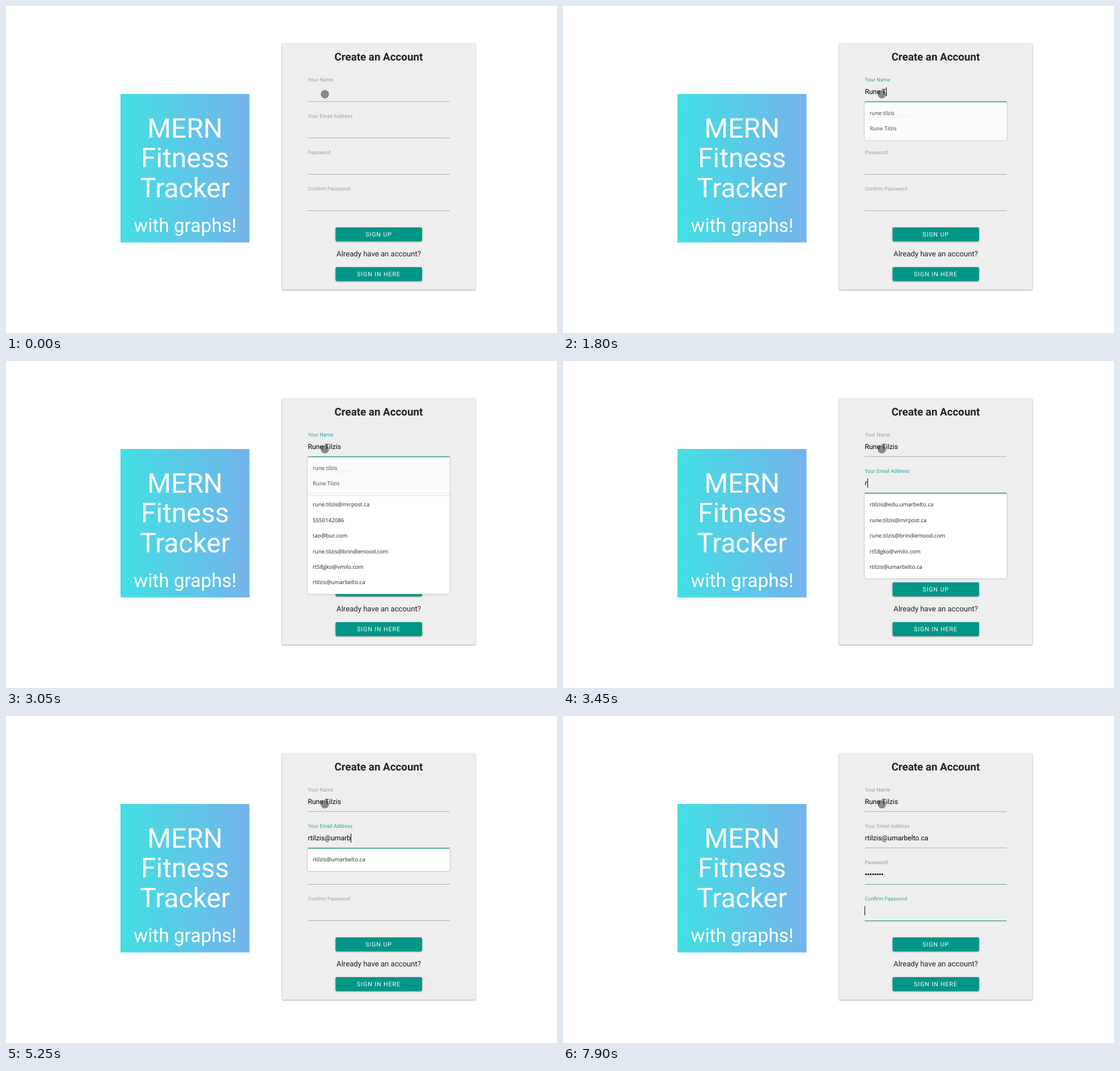
An HTML page that plays this animation: 972 px wide and 576 px high, repeating every 8000 ms.

```html
<!DOCTYPE html>
<html lang="en">
<head>
<meta charset="utf-8">
<title>Sign up form</title>
<style>
  html, body { margin: 0; width: 100%; height: 100%; overflow: hidden; background: #fff; }
  svg { display: block; width: 972px; height: 576px; }
  text { font-family: Roboto, sans-serif; text-rendering: geometricPrecision; white-space: pre; }
  .mid { text-anchor: middle; }
  .item { font: 9.7px "Open Sans", "Noto Sans", sans-serif; fill: #222; }
  .card { filter: drop-shadow(0 1px 1px rgba(0,0,0,.3)) drop-shadow(0 0 1.2px rgba(0,0,0,.16)); }
  .btn { fill: #009688; filter: drop-shadow(0 1px 1px rgba(0,0,0,.3)) drop-shadow(0 0 1px rgba(0,0,0,.16)); }
  .pop { fill: #fff; filter: drop-shadow(0 .8px 1px rgba(0,0,0,.4)); }
  .cap { font-size: 10.67px; letter-spacing: .9px; fill: #fff; }
</style>
</head>
<body>
<svg id="stage" viewBox="0 0 972 576">
  <defs>
    <linearGradient id="sky">
      <stop offset="0" stop-color="#43dfe3"/>
      <stop offset="1" stop-color="#74b3eb"/>
    </linearGradient>
  </defs>
  <rect x="202" y="155" width="227.5" height="261.5" fill="url(#sky)"/>
  <g class="mid" fill="#fff" font-size="48">
    <text x="315.8" y="231.5">MERN</text>
    <text x="315.8" y="284.3">Fitness</text>
    <text x="315.8" y="337.1">Tracker</text>
    <text x="316" y="398" font-size="33.4">with graphs!</text>
  </g>
  <rect class="card" x="487" y="66" width="341" height="433.7" rx="1.5" fill="#eee"/>
  <text class="mid" x="657.4" y="96.3" font-size="18.75" font-weight="700" fill="#212121">Create an Account</text>
  <g id="fields"></g>
  <rect class="btn" x="581.4" y="390" width="152.5" height="24.4" rx="2.3"/>
  <text class="mid cap" x="657.5" y="406">SIGN UP</text>
  <text class="mid" x="657.5" y="441" font-size="13.14" fill="#212121">Already have an account?</text>
  <rect class="btn" x="581.4" y="460" width="152.5" height="24.4" rx="2.3"/>
  <text class="mid cap" x="657.5" y="476.1">SIGN IN HERE</text>
  <g id="popups"></g>
  <circle cx="562.5" cy="155.3" r="7.4" fill="#000" fill-opacity=".43"/>
</svg>
<script>
const LOOP = 8000, LEFT = 532.4, WIDTH = 250.3, PITCH = 64.1, ROW = 27.45;
const NAME = 'Rune Tilzis', MAIL = 'rtilzis@umarbelto.ca', EDU = 'rtilzis@edu.umarbelto.ca';
const GREY = [158, 158, 158], TEAL = [38, 166, 154];
const $ = id => document.getElementById(id);

function add(parent, tag, attrs, text) {
  const el = document.createElementNS('http://www.w3.org/2000/svg', tag);
  set(el, attrs);
  if (text) el.textContent = text;
  parent.appendChild(el);
  return el;
}
function set(el, attrs) {
  for (const key in attrs) el.setAttribute(key, attrs[key]);
}
const mix = k => `rgb(${GREY.map((g, i) => Math.round(g + (TEAL[i] - g) * k))})`;

const shortNames = ['rune tilzis', NAME];
const names = [...shortNames, 'rfdsasdaf', 'rfdsasdafdfsasdfsadfsdsadfafsd'];
const contacts = ['rune.tilzis@mirpost.ca', '5550142086', 'tao@bur.com',
  'rune.tilzis@brindlemood.com', 'rt58gko@vmilo.com', MAIL];
const startsWithR = [EDU, ...contacts.filter(c => c[0] === 'r')];

// name / mail / pass: typed letters; caret: field index; f0..f3: focus strength
// top / low: popup lists; topA / lowA: their opacity
const steps = [
  [0, { name: 0, mail: 0, pass: 0, caret: -1, f0: 0, f1: 0, f2: 0, f3: 0,
        top: [], topA: 0, low: [], lowA: 0 }],
  [200, { f0: .2, caret: 0 }], [250, { f0: .45 }], [300, { f0: .7 }], [350, { f0: .9 }], [450, { f0: 1 }],
  [650, { name: 1 }], [750, { top: names, topA: .6 }], [850, { topA: 1 }],
  [1000, { name: 2, topA: .85 }], [1100, { name: 3, top: shortNames, topA: 1 }],
  [1150, { name: 4, topA: .85 }], [1250, { name: 5, topA: 1 }],
  [1800, { name: 6, topA: .85 }], [1900, { topA: 1 }],
  [2100, { name: 7, topA: .85 }], [2200, { name: 8, topA: 1 }],
  [2300, { name: 9, topA: .85 }], [2400, { topA: 1 }],
  [2750, { name: 10 }], [2950, { name: 11 }],
  [3050, { caret: -1, topA: .82, low: contacts, lowA: 1 }],
  [3200, { topA: 0, f0: .3, f1: .85, caret: 1 }],
  [3350, { f0: 0, f1: 1, mail: 1, lowA: .85 }], [3450, { low: startsWithR, lowA: 1 }],
  [3550, { mail: 2, lowA: .85 }], [3650, { mail: 3, low: [EDU, MAIL], lowA: 1 }],
  [3800, { mail: 4 }], [3900, { mail: 5 }], [4000, { mail: 6 }], [4100, { mail: 7 }],
  [4700, { mail: 8 }],
  [4950, { mail: 9, lowA: .85 }], [5050, { mail: 10, low: [MAIL], lowA: 1 }],
  [5150, { mail: 11, lowA: .85 }], [5250, { mail: 13, lowA: 1 }],
  [5600, { mail: 14 }], [5750, { mail: 15 }], [5850, { mail: 16 }],
  [6050, { mail: 17 }], [6150, { mail: 18 }],
  [6300, { mail: 19, lowA: .8 }], [6400, { mail: 20, lowA: 0 }],
  [6550, { f1: .35, f2: .82, caret: 2 }], [6650, { f1: 0, f2: 1 }],
  ...[6800, 6900, 7000, 7100, 7200, 7300, 7450, 7550].map((t, i) => [t, { pass: i + 1 }]),
  [7750, { caret: 3 }], [7900, { f2: .28, f3: .82 }]
];

const fields = ['Your Name', 'Your Email Address', 'Password', 'Confirm Password'].map((label, i) => {
  const dy = i * PITCH, g = $('fields');
  return {
    label: add(g, 'text', { x: LEFT, y: 132.8 + dy, 'font-size': 9.12 }, label),
    line: add(g, 'rect', { x: LEFT, y: 167.8 + dy, width: WIDTH, height: .85 }),
    glow: add(g, 'rect', { x: LEFT, y: 168.4 + dy, width: WIDTH, height: .95, fill: mix(1) }),
    value: add(g, 'text', { x: LEFT, y: 155 + dy, 'font-size': 12.2 })
  };
});
const dots = Array.from({ length: 8 }, (_, i) =>
  add($('fields'), 'circle', { cx: 534.6 + i * 4.1, cy: 278.8, r: 1.5 }));
const caret = add($('fields'), 'rect', { width: 1, height: 16 });

function makePopup(y) {
  const g = add($('popups'), 'g', {});
  let shown;
  return (list, alpha) => {
    set(g, { opacity: alpha });
    if (list === shown) return;
    shown = list;
    g.replaceChildren();
    add(g, 'rect', { class: 'pop', x: 532, y, width: 250.8, height: list.length * ROW + 11.8, rx: 2 });
    list.forEach((s, i) => add(g, 'text', { class: 'item', x: 541, y: y + 22.2 + i * ROW }, s));
  };
}
const showLow = makePopup(234), showTop = makePopup(169.8);

function write(el, text) {
  if (el.textContent !== text) el.textContent = text;
}

function draw(now) {
  const t = now % LOOP;
  const s = Object.assign({}, ...steps.filter(k => k[0] <= t).map(k => k[1]));
  fields.forEach((f, i) => {
    const k = s['f' + i];
    set(f.label, { fill: mix(k) });
    set(f.line, { fill: mix(k) });
    set(f.glow, { opacity: k });
  });
  write(fields[0].value, NAME.slice(0, s.name));
  write(fields[1].value, MAIL.slice(0, s.mail));
  dots.forEach((d, i) => set(d, { opacity: i < s.pass ? 1 : 0 }));

  const c = s.caret;
  if (c >= 0) {
    const w = c === 2 ? s.pass * 4.1 : fields[c].value.getComputedTextLength();
    set(caret, { x: Math.round(LEFT + w), y: 143 + Math.round(c * PITCH) });
  }
  set(caret, { opacity: c < 0 ? 0 : 1 });
  showTop(s.top, s.topA);
  showLow(s.low, s.lowA);
}

const start = performance.now();
function tick() {
  draw(performance.now() - start);
  requestAnimationFrame(tick);
}
tick();
</script>
</body>
</html>
```
